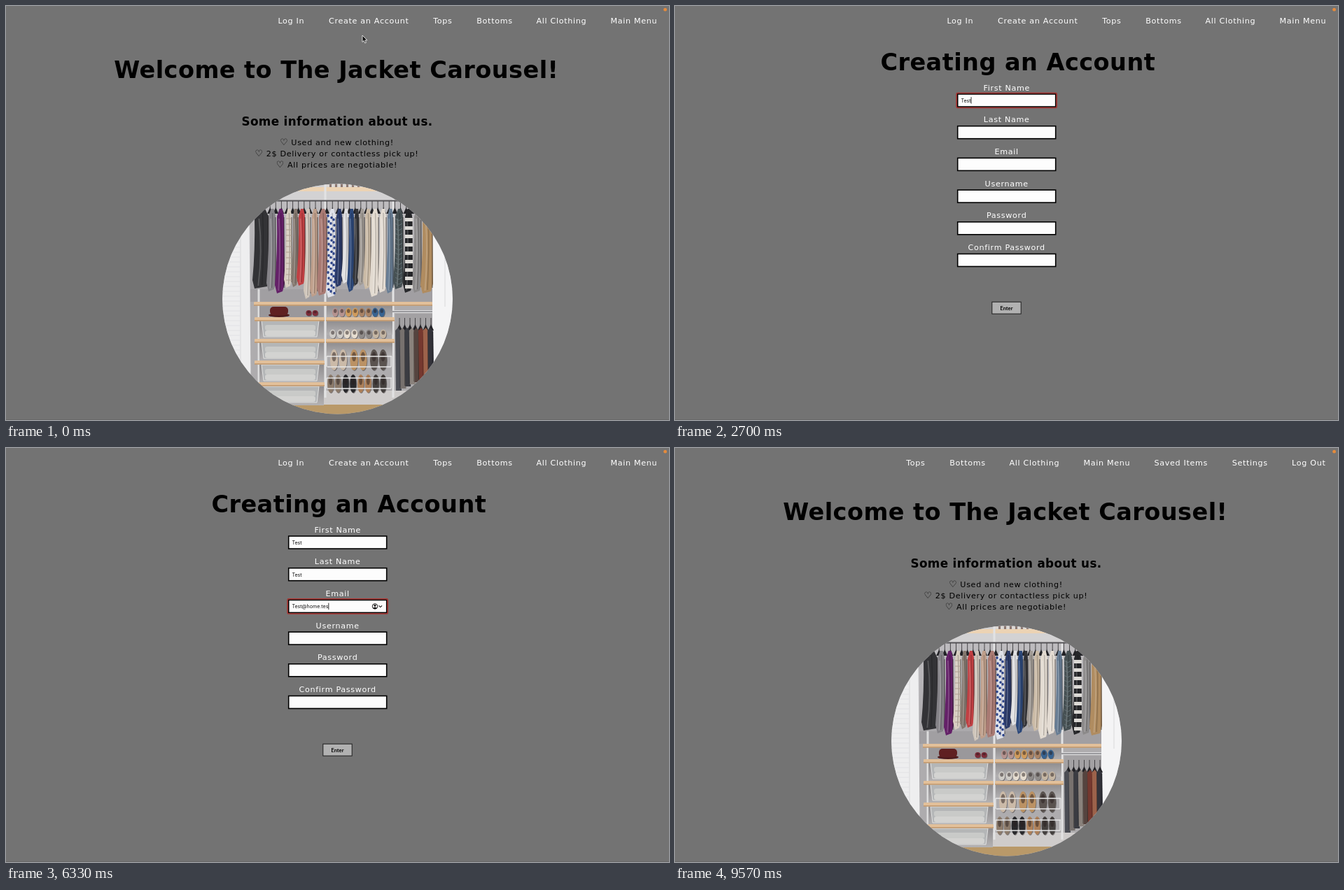
An HTML page for the animation above (9610 ms loop, 947 by 592 pixels).

```html
<!DOCTYPE html>
<html lang="en">
<head>
<meta charset="utf-8">
<title>Clothing shop sign-up</title>
<style>
html, body { margin: 0; width: 100%; height: 100%; overflow: hidden; background: #737373; }
svg { display: block; width: 100vw; height: 100vh; }
text { white-space: pre; }
.body { font: 11.18px "DejaVu Sans", sans-serif; letter-spacing: .66px; text-anchor: middle; }
.heart { font-size: 12.6px; }
.h1 { font: bold 33.54px "DejaVu Sans", sans-serif; letter-spacing: .45px; text-anchor: middle; }
.h2 { font: bold 16.77px "DejaVu Sans", sans-serif; letter-spacing: .35px; text-anchor: middle; }
.ui { font: 7.1px Inter, sans-serif; }
.strong { font-weight: 600; }
</style>
</head>
<body>
<svg id="stage" viewBox="0 0 947 592" preserveAspectRatio="none"></svg>
<script>
const LOOP = 9610;
const stage = document.getElementById('stage');

const rect = (x, y, w, h, fill, more = '') =>
  `<rect x="${x}" y="${y}" width="${w}" height="${h}" fill="${fill}" ${more}/>`;
const path = (d, fill, more = '') => `<path d="${d}" fill="${fill}" ${more}/>`;
const line = (d, color, width = 1) =>
  path(d, 'none', `stroke="${color}" stroke-width="${width}"`);
const oval = (x, y, rx, ry, fill) =>
  `<ellipse cx="${x}" cy="${y}" rx="${rx}" ry="${ry}" fill="${fill}"/>`;
const text = (s, x, y, cls, fill = '#000', more = '') =>
  `<text x="${x}" y="${y}" class="${cls}" fill="${fill}" ${more}>${s}</text>`;
const group = (id, body, more = '') => `<g id="${id}" ${more}>${body}</g>`;
const range = n => [...Array(n).keys()];
const repeat = (n, f) => range(n).map(f).join('');
const fade = (id, from, to) => `<linearGradient id="${id}" x2="0" y2="1">` +
  `<stop stop-color="${from}"/><stop offset="1" stop-color="${to}"/></linearGradient>`;

const hanger = (x, y) =>
  line(`M${x} ${y}v10`, '#3a393c', .9) + path(`M${x} ${y + 9}l-4 9h8z`, '#222226');

// x, width, bottom, colour
const tops = [
  [354, 21, 404, '#333336'], [374, 11, 408, '#858388'], [386, 11, 411, '#642068'],
  [399, 9, 403, '#d6ccbf'], [409, 8, 402, '#85786f'], [417, 10, 400, '#c14043'],
  [427, 8, 419, '#cfc5ba'], [436, 9, 416, '#bf9f8b'], [446, 12, 414, '#a97a73'],
  [459, 12, 417, '#dfe1e9'], [471, 9, 402, '#2b3a68'], [481, 8, 397, '#e1e1e3'],
  [489, 8, 409, '#2c487a'], [497, 7, 400, '#35363a'], [504, 8, 400, '#a19b95'],
  [512, 9, 405, '#cbbba6'], [521, 11, 416, '#e2dad0'], [533, 10, 410, '#e4dcd3'],
  [544, 9, 411, '#687d94'], [555, 12, 405, '#465053'], [569, 11, 410, '#26272a'],
  [582, 11, 410, '#8c8a8a'], [594, 15, 411, '#b08c60']
];

function garment([x, w, bottom, fill]) {
  const r = x + w, mid = x + w * .6;
  return path(`M${mid - 2} 290H${mid + 2}L${r} 300L${r + 1} ${bottom - 14}L${r - 2} ${bottom - 3}` +
    `L${x + 1} ${bottom}L${x - 2} ${bottom - 12}Q${x + 2} 350 ${x + 1} 301Z`, fill) +
    line(`M${x + w * .35} 304Q${x + w * .6} 350 ${x + w * .3} ${bottom - 4}`, 'rgba(255,255,255,.18)', 1.8) +
    line(`M${mid} 296Q${mid + 2} 350 ${mid - 1} ${bottom - 5}`, 'rgba(0,0,0,.2)', 1.4) +
    line(`M${r} 302V${bottom - 8}`, 'rgba(25,20,20,.42)', 1.6);
}

// A row of pairs: soles with a dark opening
function shoes(x, y, colors, step, rx, ry) {
  return colors.split(' ').map((c, i) => [-1, 1].map(k => {
    const cx = x + i * step + k * rx * 1.15;
    return oval(cx + .8, y + 1, rx, ry, 'rgba(50,45,45,.5)') + oval(cx, y, rx, ry, c) +
      oval(cx, y - ry * .3, rx * .55, ry * .45, 'rgba(40,30,30,.5)');
  }).join('')).join('');
}

function basket(y) {
  return rect(362, y, 92, 27, 'url(#bay)') +
    path(`M365 ${y}H447L444 ${y + 23}H368Z`, '#b4b6b7', 'stroke="#e2e2e2" stroke-width="1"') +
    rect(370, y + 6, 72, 8, '#c9cac8', 'rx="3"') + rect(370, y + 14, 72, 8, '#d3d3d1', 'rx="3"');
}

function closet() {
  let s = fade('wall', '#bebcbf', '#a8a6a9') + fade('bay', '#8f8d8f', '#b4b2b3');
  s += rect(309, 254, 329, 330, '#bfbec0') + rect(349, 254, 260, 25, '#d3d2d3');
  s += rect(385, 259, 172, 6, '#ecd3b4') +
    repeat(13, i => rect(458 + i * 4, 254, 3, 5, i % 2 ? '#8b7770' : '#ded9d4'));
  s += rect(349, 279, 260, 144, 'url(#wall)') + rect(349, 405, 260, 18, '#a19fa2');
  s += rect(349, 423, 260, 130, '#aeacae') + rect(349, 550, 260, 21, '#cfcccb');
  s += rect(309, 570, 329, 15, '#b99969');
  s += path('M309 254H347L350 584H309Z', '#eeeeef') + rect(609, 254, 30, 330, '#f4f4f5');
  s += repeat(33, i => line(`M309 ${310 + i * 7}H334`, '#dfdfe1', .8));
  s += line('M335 300V570M627 300V430', '#d8d8da', 1);
  s += line('M361 405V560', '#dcdcdc', 3) + line('M456 254V560M553 276V560', '#e2e2e3', 3);
  s += line('M352 278.5H609', '#565558', 1.8);
  s += repeat(31, i => hanger(361 + i * 8.1, 279)) + tops.map(garment).join('');
  s += repeat(42, i => oval(460 + i % 3 * 4 + i % 2, 300 + i * 2.7, 1.7, 1.9, '#2b4288'));
  s += repeat(9, i => rect(570, 303 + i * 12, 11, 5, '#dcdad6'));
  s += repeat(12, i => line(`M400 ${304 + i * 8}h8`, '#b0a092', 1.2));
  s += repeat(14, i => line(`M556 ${304 + i * 7}l5 3 5-3`, '#66747a', .9));

  // lower right rail
  s += rect(556, 440, 53, 30, '#a3a1a3');
  s += line('M551 437H609', '#dededf', 4) + line('M551 437H609', '#55555a', 1);
  s += repeat(7, i => hanger(562 + i * 7.5, 446));
  s += '#4b4d54 #77716e #3b3c42 #8a827c #55443f #75382f #9c624b #33333a'.split(' ').map((c, i) => {
    const x = 556 + i * 6.6;
    return path(`M${x} 464l4 -4 4 5 1 ${85 - i * 3}h-8z`, c) +
      line(`M${x + 7} 466v${80 - i * 3}`, 'rgba(0,0,0,.35)');
  }).join('');

  // baskets, hat and shoes
  s += rect(362, 428, 92, 17, '#9a989b') + [450, 481, 513, 544].map(basket).join('');
  s += oval(390, 442, 15, 3, '#4f1c1d') + rect(377, 430, 26, 12, '#5f2021', 'rx="5"');
  s += shoes(437, 439, '#7d2b38', 1, 4, 4);
  s += [428, 450, 481].map(y => rect(458, y, 94, 20, 'url(#bay)')).join('');
  s += shoes(475, 438, '#b5938f #cf9b5c #a98365 #376391', 19, 4.2, 6.5);
  s += shoes(472, 469, '#cfccc7 #e6ddd0 #8f8b89 #c5b6a3', 20.5, 4.6, 6.5);
  s += shoes(475, 506, '#cbbaa8 #bb9264 #5a534f', 28.5, 5.6, 15);
  s += shoes(469, 540, '#8c7b6b #29292c #ad8059 #45413f', 21.5, 4.6, 13);
  s += line('M458 501H551M459 516H550M458 501V516M550 501V516' +
    'M458 532H551M459 547H550M458 532V547M550 532V547', '#e6e6e6', 1.3);
  const wood = (x, y, w) => rect(x, y, w, 5.5, '#e2c09a', 'rx="1"') + rect(x, y + 4.3, w, 1.2, '#b98e60');
  s += wood(354, 423, 255) + wood(457, 445, 98) + wood(457, 476, 98);
  s += [445, 476, 507, 538].map(y => wood(355, y, 100)).join('');
  return s;
}

const nav = items => items.map(([s, x]) => text(s, x, 25, 'body', '#fff')).join('');
const guestNav = nav([['Log In', 407.3], ['Create an Account', 518.3], ['Tops', 623.8],
  ['Bottoms', 698], ['All Clothing', 793.4], ['Main Menu', 896.8]]);
const userNav = nav([['Tops', 343.8], ['Bottoms', 418], ['All Clothing', 513.4], ['Main Menu', 616.8],
  ['Saved Items', 722.7], ['Settings', 821.2], ['Log Out', 905.3]]);

const home = text('Welcome to The Jacket Carousel!', 471.8, 103, 'h1') +
  text('Some information about us.', 473, 171.3, 'h2') +
  ['Used and new clothing!', '2$ Delivery or contactless pick up!', 'All prices are negotiable!']
    .map((s, i) => text(`<tspan class="heart">♡</tspan> ${s}`, 472.5, 199 + i * 15.8, 'body')).join('') +
  `<clipPath id="round"><circle cx="473.5" cy="419" r="164.4"/></clipPath>` +
  `<g clip-path="url(#round)">${closet()}</g>`;

const labels = ['First Name', 'Last Name', 'Email', 'Username', 'Password', 'Confirm Password'];
const fieldY = i => 125.2 + i * 45.7;

const form = text('Creating an Account', 489.8, 92.3, 'h1') +
  labels.map((s, i) => {
    const y = fieldY(i);
    return text(s, 473.7, y - 4.7, 'body', '#fff') +
      rect(403.7, y + .8, 140, 18, '#fdfdfd', 'stroke="#000" stroke-width="1.6"');
  }).join('') +
  rect(452.8, 423.2, 41.4, 17, '#b1b1b1', 'stroke="#1c1c1c" stroke-width="1"') +
  text('Enter', 473.5, 434.8, 'ui strong', '#000', 'text-anchor="middle"') +
  labels.map((_, i) => i < 4
    ? text('', 408.4, fieldY(i) + 12.6, 'ui', '#111', `id="v${i}"`)
    : group('v' + i, repeat(4, k => oval(410.6 + k * 4.6, fieldY(i) + 9.7, 1.9, 1.9, '#000')))).join('') +
  group('focus', rect(402.2, -.8, 143, 21.2, 'none', 'rx="1.5" stroke="#a92f2c" stroke-width="1.5"')) +
  rect(0, 0, .8, 9.4, '#000', 'id="caret"') +
  group('person', `<circle cx="527" cy="226.4" r="3.7" fill="none" stroke="#111" stroke-width="1"/>` +
    oval(527, 225.3, 1.4, 1.5, '#111') + path('M524.2 229.2q2.8-3.4 5.6 0q-2.8 2-5.6 0', '#111') +
    line('M532.5 225.4l2.3 2.2 2.3-2.2', '#111', 1.1)) +
  group('key', rect(522.5, 3.5, 14.5, 12.5, '#ececec', 'rx="2"') + oval(528, 7.2, 2.7, 2.7, '#111') +
    oval(528, 6.1, .7, .7, '#eee') + path('M527 9h2v5l-1 1-1-1z', '#111') +
    line('M532 8.9l1.7 1.6 1.7-1.6', '#333', 1));

stage.innerHTML = rect(0, 0, 947, 592, '#737373') + rect(0, 591, 947, 1, '#676767') +
  `<circle cx="941.6" cy="5.2" r="2.4" fill="#e58b3c"/>` +
  group('guest', guestNav) + group('user', userNav) +
  group('hover', rect(444, 5.2, 148, 31, '#fdfdfd') + text('Create an Account', 518.3, 25, 'body')) +
  group('home', home) + group('form', form) +
  group('status', rect(2, 577, 151, 13, '#3d3d3d', 'rx="2"') +
    text('<tspan class="strong" fill="#fff">devserver:9090</tspan>/QX-app/joinupform.jsp',
      6, 586.1, 'ui', '#d0d0d0')) +
  group('arrow', path('M0 0V9.5L2.2 7.5 3.7 11 5.4 10.3 3.9 6.9H6.9Z', '#111', 'stroke="#fff" stroke-width=".8"')) +
  group('beam', ['#fff', '#222'].map((c, i) =>
    line('M-2.2-5Q0-5 0-3.6Q0-5 2.2-5M0-4V4M-2.2 5Q0 5 0 3.6Q0 5 2.2 5M-1.2 1.5H1.2', c, i ? .8 : 2)).join(''));

const el = {};
stage.querySelectorAll('[id]').forEach(e => el[e.id] = e);
const show = (id, on) => el[id].setAttribute('display', on ? 'inline' : 'none');
const move = (id, x, y) => el[id].setAttribute('transform', `translate(${x} ${y})`);

// time, x, y
const mouse = [[30, 509, 42], [180, 512, 26], [430, 511, 27], [730, 492, 131],
  [1070, 456, 205], [1470, 449, 145], [1750, 449, 136]];
// field, text, first key, time between keys
const typing = [[0, 'Test', 2370, 110], [1, 'Test', 3000, 133], [2, 'Test', 4700, 100],
  [2, '@home.tes', 5300, 128.75], [2, 't', 6470, 1], [3, 'Test', 6850, 110],
  [4, '****', 7530, 110], [5, '**', 8250, 150], [5, '**', 8600, 70]];
const focusTimes = [1800, 2870, 3600, 6650, 7400, 8050];

function mouseAt(t) {
  const n = mouse.findIndex(p => p[0] > t);
  if (n === 0) return mouse[0].slice(1);
  if (n < 0) return mouse[mouse.length - 1].slice(1);
  const a = mouse[n - 1], b = mouse[n], k = (t - a[0]) / (b[0] - a[0]);
  const e = k * k * (3 - 2 * k);
  return [a[1] + (b[1] - a[1]) * e, a[2] + (b[2] - a[2]) * e];
}

function draw(t) {
  const onForm = t >= 960 && t < 9220, loggedIn = t >= 9220;
  show('home', !onForm);
  show('form', onForm);
  show('guest', !loggedIn);
  show('user', loggedIn);
  show('hover', t >= 130 && t < 960);
  show('status', t >= 160 && t < 960);

  const [x, y] = mouseAt(t);
  move('arrow', x, y);
  move('beam', x, y);
  show('arrow', t < 600);
  show('beam', t >= 600 && t < 2370);

  const values = labels.map(() => '');
  for (const [i, s, start, step] of typing)
    if (t >= start) values[i] += s.slice(0, Math.floor((t - start) / step + 1.001));
  values.forEach((s, i) => {
    if (i < 4) el['v' + i].textContent = s;
    else [...el['v' + i].children].forEach((dot, k) =>
      dot.setAttribute('display', k < s.length ? 'inline' : 'none'));
  });

  const active = focusTimes.filter(f => t >= f).length - 1;
  const focused = onForm && active >= 0;
  show('focus', focused);
  show('caret', focused);
  show('person', onForm && active === 2 && t >= 4300);
  show('key', onForm && active >= 4);
  if (focused) {
    const top = fieldY(active), s = values[active];
    const end = active > 3 ? s.length * 4.6 : s ? el['v' + active].getComputedTextLength() : 0;
    move('focus', 0, top);
    move('key', 0, top);
    move('caret', 408.4 + end, top + 5);
  }
}

function tick() {
  draw(performance.now() % LOOP);
  requestAnimationFrame(tick);
}
tick();
</script>
</body>
</html>
```
